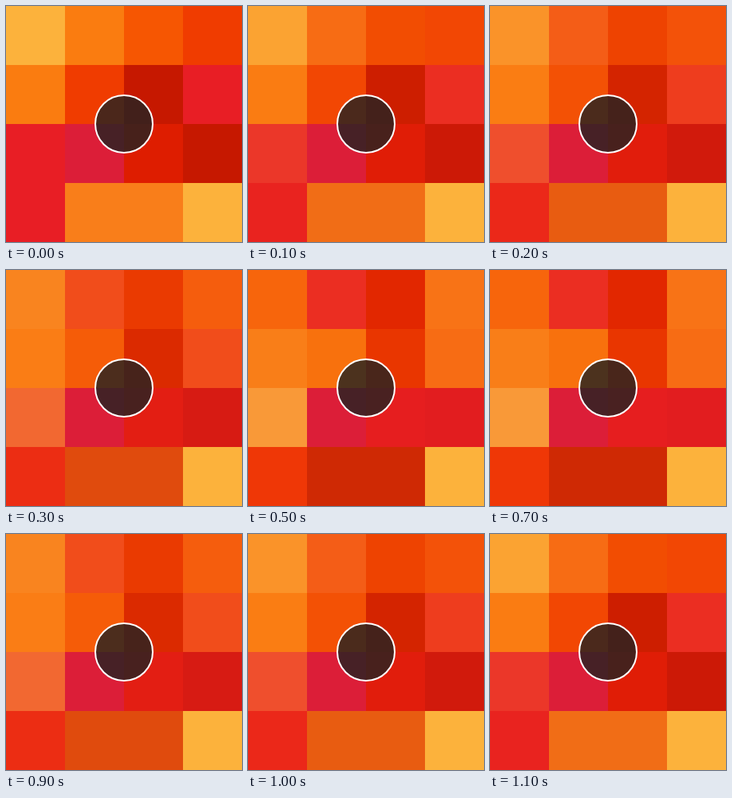
An HTML page with a canvas for the animation above (1.2 s loop, 296 px wide and 296 px high).

```html
<!DOCTYPE html>
<html>
<head>
<meta charset="utf-8">
<style>
html, body { margin: 0; width: 100%; height: 100%; overflow: hidden; }
canvas { display: block; }
</style>
</head>
<body>
<canvas id="stage" width="296" height="296"></canvas>
<script>
const ctx = document.getElementById('stage').getContext('2d');
const CELL = 74, STEP = 100, HALF = 6;

const amber = [252, 178, 60], orange = [250, 124, 16], tangerine = [249, 126, 26],
  flame = [246, 86, 2], vermilion = [240, 60, 0], scarlet = [222, 29, 0],
  brick = [198, 24, 0], red = [232, 30, 37], crimson = [220, 30, 56];

// column, row, width in cells, start colour, end colour
const tiles = [
  [0, 0, 1, amber, flame],
  [1, 0, 1, orange, red],
  [2, 0, 1, flame, scarlet],
  [3, 0, 1, vermilion, tangerine],
  [0, 1, 1, orange, tangerine],
  [1, 1, 1, vermilion, orange],
  [2, 1, 1, brick, vermilion],
  [3, 1, 1, red, orange],
  [0, 2, 1, red, amber],
  [1, 2, 1, crimson, crimson],
  [2, 2, 1, scarlet, red],
  [3, 2, 1, brick, red],
  [0, 3, 1, red, vermilion],
  [1, 3, 2, tangerine, brick],
  [3, 3, 1, amber, amber]
];

function mix(a, b, k) {
  return `rgb(${a.map((v, i) => Math.round(v + (b[i] - v) * k)).join(',')})`;
}

function draw(ms) {
  const step = Math.floor(ms / STEP) % (2 * HALF);
  const k = 1 - Math.abs(step - HALF) / HALF;
  for (const [x, y, w, from, to] of tiles) {
    ctx.fillStyle = mix(from, to, k);
    ctx.fillRect(x * CELL, y * CELL, w * CELL, CELL);
  }
  ctx.beginPath();
  ctx.arc(148, 148, 36, 0, Math.PI * 2);
  ctx.fillStyle = 'rgba(34,34,34,0.8)';
  ctx.fill();
  ctx.lineWidth = 2;
  ctx.strokeStyle = '#fff';
  ctx.stroke();
}

const start = performance.now();
function tick() {
  draw(performance.now() - start);
  requestAnimationFrame(tick);
}
tick();
</script>
</body>
</html>
```
